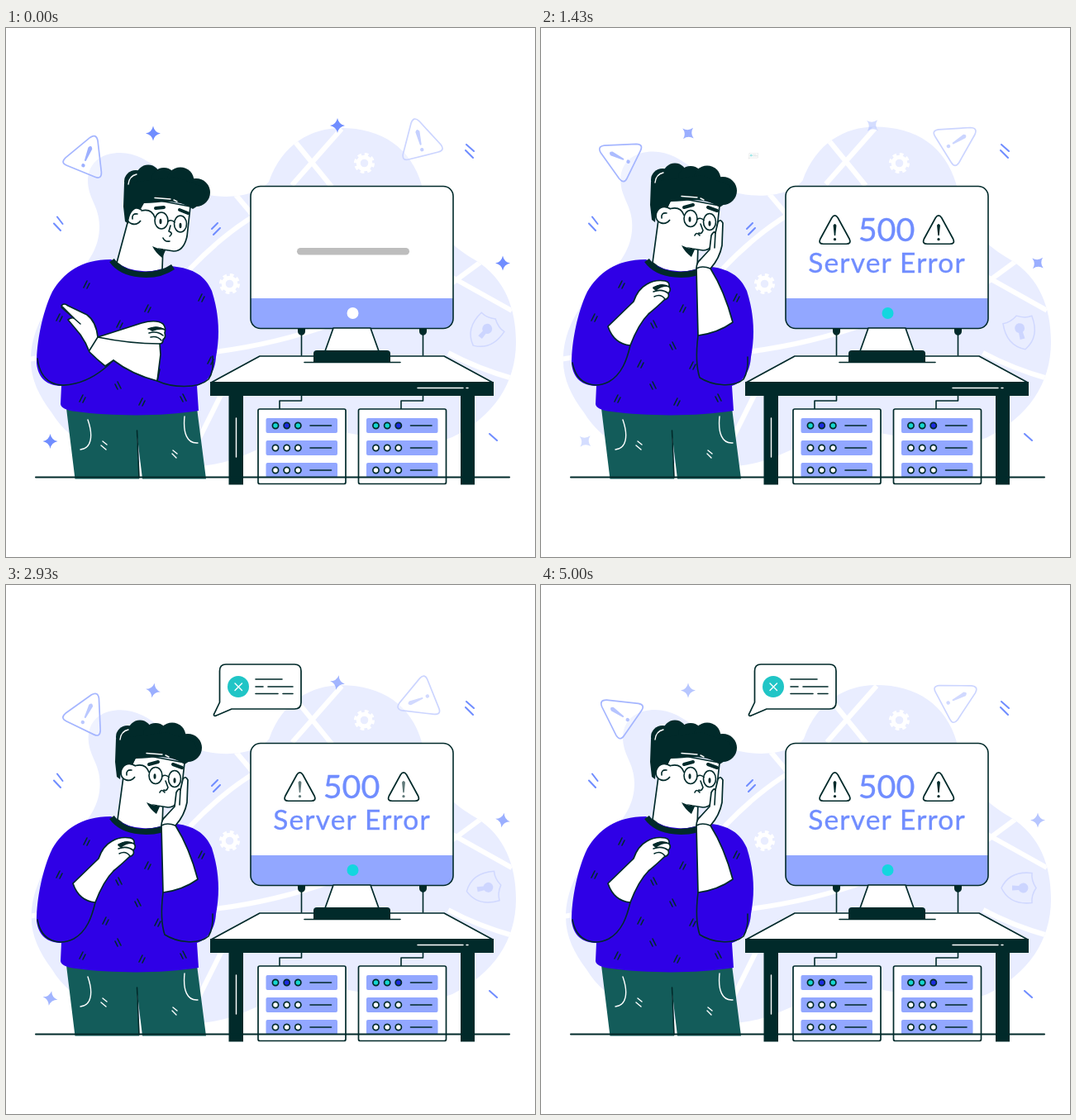
An HTML page that plays this animation: 640 by 640 pixels, repeating every 5070 ms.

```html
<!DOCTYPE html>
<html lang="en">
<head>
<meta charset="utf-8">
<title>Server error</title>
<style>
html,body{margin:0;width:100%;height:100%;overflow:hidden;background:#fff}
svg{display:block;width:100vw;height:100vh}
.d{fill:#012a2a}
.l{fill:none;stroke:#012a2a;stroke-width:1.6;stroke-linecap:round;stroke-linejoin:round}
.w{fill:#fff;stroke:#012a2a;stroke-width:1.7;stroke-linejoin:round}
.h{fill:none;stroke:#fff;stroke-width:1.4;stroke-linecap:round}
.b{fill:#92a7ff}
.s{fill:#2f00e6;stroke:none}
.a{fill:none;stroke:#708dff;stroke-width:2;stroke-linecap:round}
.thick{stroke-width:4}
.collar{stroke-width:7;stroke-linecap:butt}
text{font-family:Lato,"Open Sans",sans-serif;fill:#708dff;stroke:#708dff;stroke-width:.35;text-anchor:middle}
</style>
</head>
<body>
<svg viewBox="0 0 640 640">
<defs>
  <path id="blob" d="M113 240C113 215 99 207 99 184C100 160 119 151 138 151C177 151 195 190 240 201C272 208 305 202 318 186C334 140 370 121 405 121C455 121 490 145 503 190C514 240 535 262 568 281C604 303 617 340 617 380C617 430 590 470 540 495C470 520 420 475 350 490C310 503 280 530 225 530C150 530 85 515 55 465C40 445 30 425 30 402C30 370 45 340 70 315C95 290 113 270 113 240Z"/>
  <clipPath id="land"><use href="#blob"/></clipPath>
  <path id="tri" d="M-5-25Q0-32.500 5-25L23.500 9Q27 17 18.500 17H-18.500Q-27 17-23.500 9Z"/>
  <path id="bang" d="M-2.600-13Q0-18 2.600-13L1 3Q0 4.500-1 3ZM-2.200 9.500a2.200 2.200 0 1 0 4.400 0a2.200 2.200 0 1 0-4.400 0Z"/>
  <path id="star" fill="#708dff" d="M0-9Q1.500-1.500 9 0Q1.500 1.500 0 9Q-1.500 1.500-9 0Q-1.500-1.500 0-9Z"/>
  <g id="gear" fill="none" stroke="#fff">
    <circle r="7.300" stroke-width="5"/>
    <circle r="10" stroke-width="5" stroke-dasharray="4.300 3.554"/>
  </g>
  <g id="hair" class="d">
    <circle cx="157" cy="186" r="14"/><circle cx="172" cy="180" r="14.500"/>
    <circle cx="191" cy="184" r="15"/><circle cx="211" cy="185" r="16.500"/>
    <circle cx="230" cy="199" r="17"/>
    <path d="M143 188L205 180L238 192L243 208L226 219C206 205 186 212 167 212L163 219C156 216 149 222 148 237L144 234L142 216Z"/>
    <path class="h" d="M148 189Q149 179 158 177M180 205.500L199 207M203 208L207 210"/>
  </g>
  <g id="head">
    <path class="w" d="M154 232Q170 262 190 268L203 270Q215 270 219 252L223 216L165 205Z"/>
    <path fill="#fff" d="M152 228L196 230L190 267L150 262Z"/>
    <path class="d" d="M177 264Q185 268 193 269L189 278Q181 272 177 264Z"/>
    <path class="w" d="M164 220C155 214 146 219 146 228C146 237 157 241 163 233"/>
    <path class="l" d="M153 231Q152 224 159 225"/>
  </g>
  <g id="glasses" class="l">
    <ellipse cx="188" cy="233" rx="8" ry="10"/><ellipse cx="211" cy="237" rx="7.500" ry="10"/>
    <path d="M196 234Q200 231 204 235M164 221Q176 218 180 229"/>
    <ellipse class="d" cx="187" cy="234" rx=".7" ry="2.500"/><ellipse class="d" cx="211" cy="239" rx=".7" ry="2.500"/>
  </g>
  <g id="torso">
    <path class="s" d="M127 280C90 280 69 297 56 319C44 344 37 380 37 406C39 424 50 433 67 433L66 455Q67 462 85 464C130 470 190 470 233 463L231 433C246 428 253 414 254 398C259 372 258 346 249 318C241 300 228 291 200 288Q160 304 127 280Z"/>
    <path class="l collar" d="M128 281C142 301 180 304 202 289"/>
  </g>
</defs>

<g id="back">
  <use href="#blob" fill="#e9edff"/>
  <g clip-path="url(#land)" fill="none" stroke="#fff" stroke-width="6">
    <path d="M350 138L394 192M406 122L346 190M278 202L300 228M304 225Q262 250 222 292M535 299L612 342M584 276L535 312M535 393Q570 412 616 425M235 394Q320 385 395 358M262 440L232 500M25 401Q60 398 90 380"/>
  </g>
</g>
<use href="#gear" x="433.500" y="163.500"/><use href="#gear" x="270.500" y="309.500"/>
<path class="a" d="M62 228.500L68.500 237M58 236.500L66 245M557 141L566 149M556 148L565 157M249 243L256 236M251 250L259 242M585 491L594 499"/>
<g id="icons"></g>

<g id="man">
  <path fill="#135c5a" d="M73 460L83.500 545.500H161L158 487L165 545.500H242L231 460Z"/>
  <path class="l" d="M158.500 487L161 544"/>
  <path class="h" d="M99 474C106 494 103 509 90 510M216 470C214 490 219 503 232 502M115 505L121 510M117 500L122 504M201 515L206 520M202 511L207 515"/>
  <g id="calm">
    <path class="w" d="M148 232L134 284Q155 302 189 292L190 264Z"/>
    <use href="#head"/><use href="#hair"/><use href="#glasses"/>
    <path class="l" d="M199 239L197 246Q203 248 198 252M190 254Q192 259 198 258"/>
    <path class="l thick" d="M181 218L191 217M210 220L220 224"/>
    <use href="#torso"/><g id="knitA" class="l"></g>
    <path class="w" d="M67 336Q70 332 75 336L98 347Q109 355 111 374L164 357Q182 352 190 358Q194 363 192 369Q194 374 190 377Q190 382 186 382L187 395L183 427Q152 419 130 402L120 409Q110 401 101 392Q97 381 90 371L75 353Q79 350 82 351Z"/>
    <path class="l" d="M67 338L90 358M111 374Q150 382 186 382M111 374L101 390M172 364Q182 360 192 365M173 369Q183 366 190 372M175 374Q183 372 188 378"/>
    <path class="d" d="M172 364Q182 358 193 365Q184 364 177 367Z"/>
    <path class="l" d="M38 400C42 430 62 436 84 430C105 425 120 412 130 402M183 427C200 435 232 437 245 425Q252 415 250 397M183 427L186 413"/>
  </g>
  <g id="shock">
    <path class="w" d="M142 232L135 284Q155 302 189 292L190 264Z"/>
    <use href="#head" x="-7" y="-1"/><use href="#hair" x="-10" y="-2"/><use href="#glasses" x="-7" y="-2.500"/>
    <path class="l" d="M193 237L196 245Q194 250 191 248M186 251Q188 246 192 251"/>
    <path class="l thick" d="M173 217L184 214M202 217L213 221"/>
    <use href="#torso"/><g id="knitB" class="l"></g>
    <path class="w" d="M190 372L188 291Q188 284 193 280L204 268L206 251Q209 245 211 248L214 235Q217 230 220 236L219 263Q216 279 205 291Q222 318 232 356Q214 369 190 372Z"/>
    <path class="l" d="M211 248L210 266M188 291Q195 287 205 291"/>
    <path class="w" d="M81 361L112 331Q117 316 128 310Q138 304 150 306Q156 307 155 313Q158 317 154 321Q156 327 149 329Q142 336 130 346Q118 358 108 384Q88 382 81 361Z"/>
    <path class="l" d="M136 314Q145 309 155 313M136 319Q146 315 154 321M137 325Q145 321 150 328"/>
    <path class="d" d="M135 315Q145 306 156 313Q146 312 139 318Z"/>
    <path class="l" d="M38 405C43 433 66 436 82 428C98 419 104 401 108 384M190 372Q186 405 192 423C206 432 232 436 245 425Q251 415 250 398"/>
  </g>
</g>

<g id="desk">
  <rect x="296" y="191" width="245" height="172" rx="12" fill="#fff"/>
  <path class="b" d="M296 327H541V351Q541 363 529 363H308Q296 363 296 351Z"/>
  <rect class="l" x="296" y="191.500" width="245" height="172" rx="12"/>
  <circle id="power" cx="419.500" cy="345" r="7"/>
  <g id="load">
    <rect x="352" y="266" width="136" height="8.500" rx="4.250" fill="#bdbdbd"/>
    <rect id="bar" x="352" y="266" width="0" height="8.500" rx="4.250" fill="#9e9e9e"/>
  </g>
  <g id="error">
    <text x="418" y="258" font-size="39.500">500</text>
    <text x="418.500" y="295.500" font-size="33.500" letter-spacing="1.200">Server Error</text>
    <g id="alerts"></g>
  </g>
  <path class="w" d="M307 397H530L589 429H248Z"/>
  <path class="w" d="M396 363H441L451 391H386Z"/>
  <path class="d" d="M372 405V394Q372 390 376 390H461Q465 390 465 394V405Z"/>
  <path class="l" d="M361 404.500H477M357.500 370V396M504.500 370V396M357.500 444V451H331V461M504.500 444V451H478V461"/>
  <path class="d" d="M353 363H362V367Q362 371 357.500 372Q353 371 353 367ZM500 363H509V367Q509 371 504.500 372Q500 371 500 367Z"/>
  <path class="d" d="M247 428H590V445H567V552.500H550V445H287V552.500H269.500V445H247Z"/>
  <path class="h" d="M498 435.500H553M557 435.500H559M278.500 472V519"/>
  <g id="racks"></g>
  <path class="l" style="stroke-width:2" d="M36 543.500H609"/>
</g>

<g id="bubble">
  <path class="w" d="M266 96H349Q357 96 357 104V142Q357 150 349 150H273L253 158.500Q250.500 158 252 155.500L258.500 142V104Q258.500 96 266 96Z"/>
  <circle cx="281" cy="123" r="13" fill="#20c5c6"/>
  <path class="h" d="M277 119L285.500 127.500M285.500 119L277 127.500"/>
  <path class="l" d="M302 114H334M302 123H311M317 123H347M302 131.500H329M335 131.500H347"/>
</g>
</svg>
<script>
const $ = id => document.getElementById(id);
const LOOP = 5070, FPS = 14, SWAP = 1000;
const TIMES = [0, 790, 1430, 2430, 3430, 4290, 5000];

// Piecewise motion through a few key values
function mix(t, vals, times = TIMES) {
  let i = 0;
  while (i < times.length - 2 && t > times[i + 1]) i++;
  const u = Math.min(1, Math.max(0, (t - times[i]) / (times[i + 1] - times[i])));
  return vals[i] + (vals[i + 1] - vals[i]) * (1 - Math.cos(Math.PI * u)) / 2;
}

const starA = [1, 1, .7, .9, .5, .25, .5];
const starB = [1, 1, .3, .9, .4, .95, 0];
const starTurn = [0, 18, 42, 0, 22, 15, 0];
const star = (x, y, fade) => ({ x, y, fade, turn: starTurn, art: '<use class="part" href="#star"/>' });
const sign = (x, y, line, dot, turn, fade) => ({ x, y, turn, fade,
  art: `<use href="#tri" fill="#fff" fill-opacity=".3" stroke="${line}" stroke-width="1.700"/><use class="part" href="#bang" fill="${dot}"/>` });

const icons = [
  star(178, 127.5, starA), star(601, 284.5, starA),
  star(401, 118, starB), star(53.5, 500, starB),
  sign(97, 157.5, '#a5b6ff', '#9db0ff', [22, 3, -64, 22, 30, -35, -55], [1, 1, .85, 1, .4, .2, .75]),
  sign(501, 138, '#ccd5ff', '#c5d0ff', [-14, -42, 58, -90, -134, -42, 62], [1, 1, .9, 1, .6, .5, .8]),
  { x: 580, y: 366.5, turn: [40, 90, -15, 0, 160, 200, 90], fade: [1, 1, 1, 1, .9, .9, 1],
    art: `<path fill="none" stroke="#d0d8ff" stroke-width="1.500" d="M0-19Q9-13 18-14Q21 13 0 23Q-21 13-18-14Q-9-13 0-19Z"/>
      <path class="part" fill="#ccd5ff" d="M-2.500 2A6 6 0 1 1 2.500 2L3 10H-3Z"/>` }
];
$('icons').innerHTML = icons.map(i => `<g>${i.art}</g>`).join('');
icons.forEach((i, n) => {
  i.el = $('icons').children[n];
  i.part = i.el.querySelector('.part');
});

$('alerts').innerHTML = [355.5, 481].map(x =>
  `<g transform="translate(${x} 248.5) scale(.75)"><use href="#tri" fill="#fff" stroke="#012a2a" stroke-width="2.300"/><use class="mark" href="#bang" fill="#012a2a"/></g>`).join('');
const marks = document.querySelectorAll('.mark');

// Server cabinets
let racks = '';
[0, 121.5].forEach(dx => {
  racks += `<g transform="translate(${dx})"><rect class="w" x="305" y="461" width="106" height="90.500" rx="2"/>`;
  [472, 499, 526].forEach((y, row) => {
    racks += `<rect class="b" x="314.500" y="${y}" width="86.500" height="18" rx="2"/><path class="l" d="M368 ${y + 9}H393.500"/>`;
    [326, 339.7, 353.3].forEach(x => racks += `<circle class="w ${row ? '' : 'led'}" cx="${x}" cy="${y + 9}" r="3.600"/>`);
  });
  racks += '</g>';
});
$('racks').innerHTML = racks;
const leds = [...document.querySelectorAll('.led')];

const knit = spots => spots.map(([x, y, s = 1]) =>
  `<path d="M${x - 3 * s} ${y + 4}l${4 * s} -8M${x + s} ${y + 5}l${3 * s} -6"/>`).join('');
const shared = [[97, 310], [236, 326], [64, 350], [171, 339], [136, 432, -1], [92, 448], [164, 452], [215, 447, -1]];
$('knitA').innerHTML = knit([...shared, [137, 358], [247, 402]]);
$('knitB').innerHTML = knit([...shared, [120, 406], [137, 358, -1], [160, 384, -1], [183, 408]]);

const show = (id, on) => $(id).style.display = on ? '' : 'none';

function draw(t) {
  const sway = t < 4000 ? Math.sin(Math.PI * t / 1000) : 0;
  $('back').setAttribute('transform', `translate(617 420) scale(${1 - .0055 * sway}) translate(-617 -420)`);
  for (const i of icons) {
    i.el.setAttribute('transform', `translate(${i.x} ${i.y}) rotate(${mix(t, i.turn)})`);
    i.part.setAttribute('opacity', mix(t, i.fade));
  }

  const failed = t >= SWAP;
  show('calm', !failed);
  show('shock', failed);
  show('load', !failed);
  show('error', failed);
  $('bar').setAttribute('width', 136 * Math.min(1, t / 975));
  $('power').setAttribute('fill', t < 330 ? '#fff' : '#14d6df');
  const step = failed ? 0 : Math.floor(t / 333);
  leds.forEach((led, n) => {
    const lit = n % 3 === ((n < 3 ? 1 : 2) + step) % 3;
    led.style.fill = lit ? '#1c2be0' : '#14d6cf';
  });
  const glow = mix(t, [1, 1, 1, .25, 1, .5, 1]);
  marks.forEach(m => m.setAttribute('opacity', glow));

  const size = mix(t, [0, .11, .8, 1.16, .985, 1], [1360, 1430, 1710, 1960, 2430, 2860]);
  show('bubble', size > 0);
  $('bubble').setAttribute('transform', `translate(251 158) scale(${size}) translate(-251 -158)`);
  $('bubble').setAttribute('opacity', Math.min(1, .35 + size));
}

function tick(now) {
  const frame = Math.floor(((now % LOOP) + 5) * FPS / 1000);
  draw(Math.min(frame, 70) * 1000 / FPS);
  requestAnimationFrame(tick);
}
draw(0);
requestAnimationFrame(tick);
</script>
</body>
</html>
```
